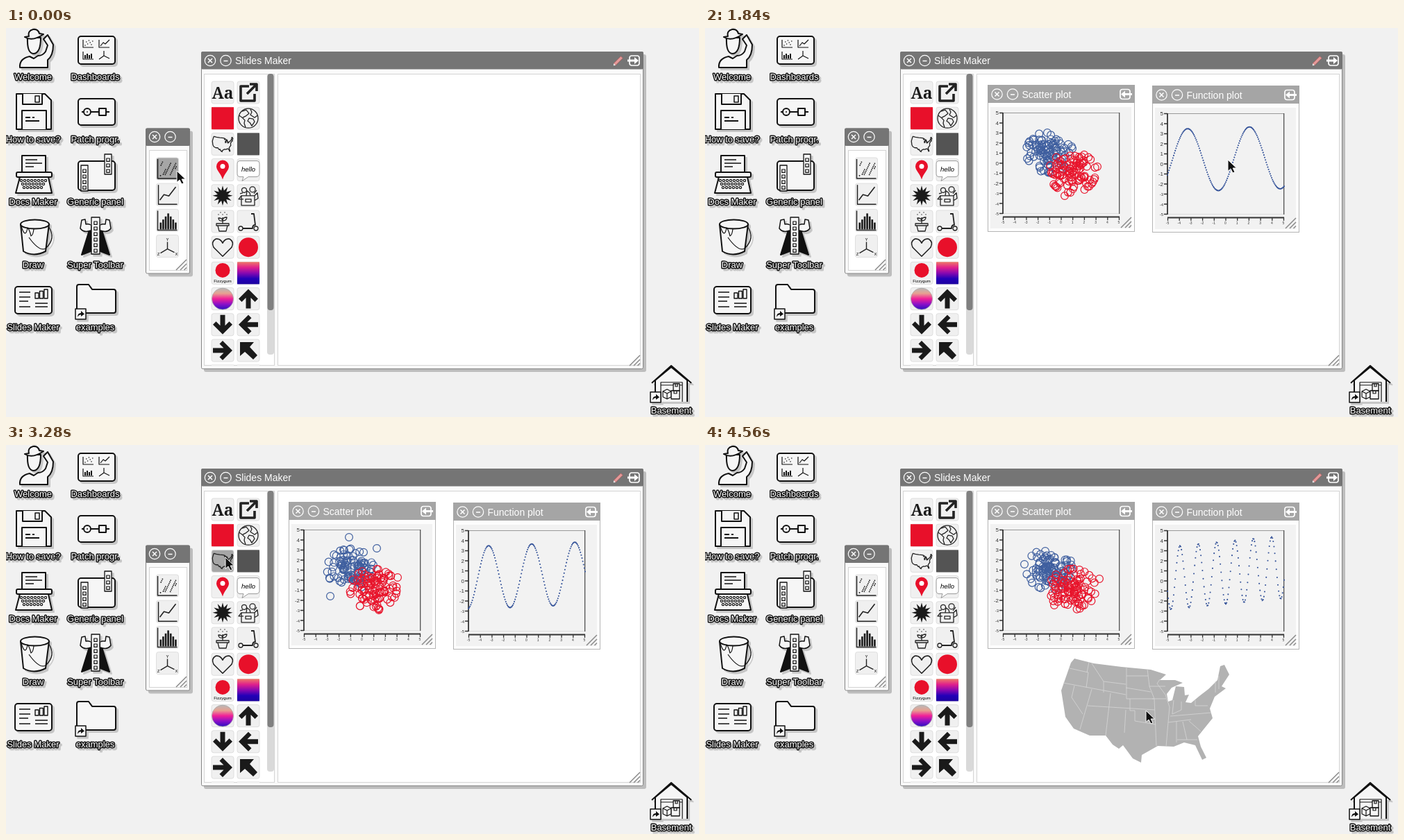
Recreate the animation shown at these times as an HTML page. Size 998 px wide and 561 px high, loop 4.64 s.

```html
<!DOCTYPE html>
<html lang="en">
<head>
<meta charset="utf-8">
<title>Desktop</title>
<style>
html, body { margin: 0; width: 100%; height: 100%; overflow: hidden; background: #f1f1f1; }
svg { display: block; width: 998px; height: 561px; font-family: Arial, "Liberation Sans", sans-serif; }
.icons { fill: #f6f6f6; stroke: #111; stroke-width: 2; stroke-linejoin: round; filter: drop-shadow(3px 3px 0 #c6c6c6); }
.icons text { font-size: 13px; text-anchor: middle; fill: #fff; stroke: #111; stroke-width: 3px; paint-order: stroke; }
.line { fill: none; stroke: #222; stroke-width: 1.3; stroke-linejoin: round; }
.title { font-size: 14px; fill: #fff; }
.tiny { font-size: 6px; text-anchor: middle; }
</style>
</head>
<body>
<svg id="stage" viewBox="0 0 998 561"></svg>
<script>
const LOOP = 4640, STEP = 80;

const P = (d, a = '') => `<path d="${d}" ${a}/>`;
const R = (x, y, w, h, a = '') => `<rect x="${x}" y="${y}" width="${w}" height="${h}" ${a}/>`;
const C = (x, y, r, a = '') => `<circle cx="${x}" cy="${y}" r="${r}" ${a}/>`;
const T = (x, y, s, a = '') => `<text x="${x}" y="${y}" ${a}>${s}</text>`;
const G = (x, y, s) => `<g transform="translate(${x} ${y})">${s}</g>`;
const L = (d, w = 1.3) => P(d, `class="line" style="stroke-width:${w}"`);
const times = (n, f) => Array.from({ length: n }, (_, i) => f(i)).join('');
const BLACK = 'fill="#111" stroke="none"';
const THIN = 'fill="none" stroke-width="1.2"';
const INK = 'fill="#1a1a1a"';
const RED = 'fill="#e8102a"';

// ---- map ----
const land = 'M532 308L560 315 600 320 642 324 664 331 655 339 677 339 688 343 672 350 665 359 667 370 673 368 678 348 690 349 691 361 697 360 692 371 700 372 712 362 725 352 738 339 742 319 748 317 755 331 744 348 750 351 734 363 727 380 731 394 710 420 714 435 722 451 716 454 706 433 690 429 675 435 652 434 629 447 628 458 616 452 602 433 596 438 587 432 577 419 554 419 531 409 519 392 513 354 527 314Z';
const borders = 'M525 322L552 328 549 350M516 343L606 360M532 347L528 364 544 388M557 352L540 410M551 376L648 382M584 358L577 419M606 382L604 415M553 313L550 328M557 315L574 341 606 345M574 341V357M607 320V366M607 333H638M606 350L642 356M607 366H646M612 366V383H619V398L649 403M637 323L640 348 647 366 650 434M640 348H663M644 366H664M655 338L651 344 663 360 669 378 667 400 664 435M675 368L673 388 686 382V370M670 391L729 386M667 400L700 396M679 399V429M688 399L694 425H709M680 425H694M697 398L714 413M706 368V376H724M735 341V357M740 333V352';

// ---- desktop icons ----
const tower = (n, w = 10) => R(0, 0, w, n * 8 + 5, 'stroke-width="1.3"') +
  times(n, i => R(w / 2 - 2.2, 6 + i * 8, 4.4, 4.4, THIN));
const badge = R(0, 0, 15, 15, 'stroke-width="1.5"') + P('M3 12Q3 6 8 6V3L13 7.5 8 11V8.5Q5 8 3 12Z', BLACK);
const board = (y, h = 40) => R(104, y, 53, h, 'rx="4"');

const greeter = P('M20 57Q19 44 34 41L40 44 46 40Q53 40 57 34L60 25 54 16 60 10 68 24Q68 40 60 46V57Z') +
  P('M31 14Q30 37 40 37 50 36 50 14Z') + P('M27 13Q38 20 54 9L48 8Q46 1 39 2 31 4 33 12Z');

const boards = board(12) + P('M111 17v11h15M134 17v11h15M111 34v11h15M136 26l4-5 3 2 6-6M141 33v7l-7 5M141 40l8 4', THIN) +
  times(4, i => P(`M${114 + i * 3} 44v-${5 + i % 2 * 2}`)) +
  times(7, i => C(114 + i * 1.8, 25 - (i * 5) % 8, .8, BLACK));

const floppy = P('M15 95H56L65 104V146H15Z') + P('M24 95V110H52V95M23 146V119H58V146') +
  R(42, 98, 6, 9, 'stroke-width="1.5"') + P('M28 129H35M38 129H41M28 134H48');

const patch = board(102, 38) + C(117, 121, 5) + R(134, 116, 10, 10) + P('M109 121h3M122 121h12M144 121h5') + C(117, 121, 1, BLACK);

const writer = R(23, 184, 34, 25) + P('M28 190H45M28 195H52M28 200H40', 'stroke-width="1.5"') + R(15, 208, 51, 7, 'rx="2"') +
  P('M20 215H61L66 238H14Z') +
  times(3, r => times(8 - r, i => C(22 + r * 2 + i * 5, 220 + r * 5, 1.6, 'fill="#fff" stroke-width="1.2"')));

const panel = board(192, 42) + G(108, 198, tower(4)) + G(142, 182, tower(3));

const bucket = P('M21 283L25 322Q40 331 57 322L62 283') + '<ellipse cx="41.5" cy="283" rx="20.5" ry="6.5"/>' +
  P('M22 286Q28 305 31 288 34 291 36 300 39 299 40 290M61 286Q73 303 57 318 48 323 33 302', THIN);

const wing = P('M-7-36L-20 6-7 1Z', 'fill="#111"') +
  P('M-7-29Q-17-25-22-32L-20-44-15-45-14-38Q-10-39-7-37', 'stroke-width="1.5"');
const hero = G(129, 321, wing + `<g transform="scale(-1 1)">${wing}</g>`) + G(123, 273, tower(6, 12));

const slides = R(13, 373, 53, 39, 'rx="4"') + P('M19 381H35M19 388H35M19 394H32M19 402H35M42 402H60M42 397H60', 'stroke-width="1.6"') +
  times(3, i => R(42 + i * 6.5, 382 - i * 2.5, 5, 8 + i * 2.5, 'stroke-width="1.4"'));

const folder = P('M102 411V373Q102 370 105 370H119L124 377H155Q158 377 158 380V408Q158 411 155 411Z') + G(100, 405, badge);

const shed = P('M935 539V508L958 489 981 508V539M930 512L958 487 987 512') + P('M943 539V511H974V539M943 515H974', THIN) +
  P('M946 524l6-3 6 3v8l-6 3-6-3ZM946 524l6 3 6-3M952 527v8', THIN) +
  R(958, 523, 12, 12, 'stroke-width="1.3"') + R(961, 513, 9, 10, 'stroke-width="1.3"') +
  P('M964 513v4h3v-4M962 523v4h4v-4', THIN) + G(928, 525, badge);

const names = ['Welcome', 'Dashboards', 'How to save?', 'Patch progr.', 'Docs Maker', 'Generic panel', 'Draw', 'Super Toolbar', 'Slides Maker', 'examples'];
const labels = names.map((s, i) => T(39 + i % 2 * 89.5, 75 + (i >> 1) * 90.2, s)).join('') + T(958, 556, 'Basement');
const desktop = `<g class="icons">${greeter}${boards}${floppy}${patch}${writer}${panel}${bucket}${hero}${slides}${folder}${shed}${labels}</g>`;

// ---- window parts ----
const bullets = (x, y) => G(x, y, `<g fill="none" stroke="#fff" stroke-width="1.2">${C(0, 0, 7.7)}${C(22.5, 0, 7.7)}` +
  P('M-3-3l6 6m0-6l-6 6M19.5 .5h6', 'stroke-width="1.5"') + '</g>');
const grip = (x, y) => G(x, y, P('M-15 0L0-15M-9 0L0-9M-3.5 0L0-3.5', 'stroke="#8a8a8a" stroke-width="1.5"'));
const frame = (x, y, w, h) => R(x + 4, y + 4, w, h, 'rx="3" fill="#bdbdbd"') +
  R(x + .5, y + .5, w - 1, h - 1, 'rx="2" fill="#fafafa" stroke="#858585"') + R(x, y, w, 25.5, 'rx="2" fill="#757575"');
const pane = (x, y, w, h) => R(x + .5, y + .5, w, h, 'fill="#fff" stroke="#d4d4d4"');
const button = (x, y, id, icon) => G(x, y, R(-16, -16, 32, 32, `id="${id}" rx="3" fill="#f0f0f0" stroke="#dedede"`) + icon);
const portal = (x, y, side) => G(x, y, R(-7, -7, 14, 14, 'rx="3" fill="none" stroke="#fff" stroke-width="1.7"') +
  P('M-10-1.5H0V-5L6 0 0 5V1.5H-10Z', `fill="#fff" transform="scale(${side} 1)"`));

// ---- tool icons ----
const spikes = times(24, i => {
  const a = i * Math.PI / 12, r = i % 2 ? 7.5 : 14.5;
  return `${i ? 'L' : 'M'}${(r * Math.sin(a)).toFixed(1)} ${(-r * Math.cos(a)).toFixed(1)}`;
}) + 'Z';
const block = side => R(-16, -16, 32, 32, side);
const arrow = a => P('M0-14L14 0 9.5 4.5 3.5-1.5V14H-3.5V-1.5L-9.5 4.5-14 0Z', `${INK} transform="rotate(${a})"`);
const letters = T(0, 9, 'Aa', `text-anchor="middle" font-size="23" font-weight="700" font-family="Noto Serif, serif" ${INK}`);
const popOut = L('M1-9H-11V12H9V2M2-12H12V-2M11-11L-2 2', 3.6);
const globe = C(0, 0, 14, 'class="line"') + L('M-13-4Q-8-1-5 3L-6 7-4 13M-9-10L-3-12 1-7-4-3-8-1M3-13L5-9 3-5 9-1 13-4M1 0L7 1 9 5 5 11 2 6-1 4Z');
const country = `<g transform="scale(.122 .148) translate(-634 -383)">${P(land, 'class="line" vector-effect="non-scaling-stroke"')}</g>`;
const pin = P('M0 14C-2 6-9 1-9-5A9 9 0 0 1 9-5C9 1 2 6 0 14Z', RED) + C(0, -5, 3.5, 'fill="#fff"');
const speech = P('M-12-13H12Q16-13 16-8V5Q16 10 11 10H0L-9 16-7 10H-12Q-16 10-16 5V-8Q-16-13-12-13Z', 'fill="#fff" stroke="#999"') +
  T(0, 2, 'hello', 'font-size="9.5" font-style="italic" text-anchor="middle"');
const toyBox = L('M-10 0H9V14H-10ZM-10 0L-14 5H-7M9 0L13-4 14 4 9 7M-4 5H4V9H-4Z') + C(-6, -8, 3.5, 'class="line"') +
  C(6, -9, 4, 'class="line"') + L('M-3 0L-2-7 2-4 3 0M-12-3L-8-4M8-3L12-8');
const plant = L('M-9 3H9V6H-9ZM-7 6L-5 14H5L7 6M0 3V-6M0-1Q-6 0-6-5 0-5 0-1Q6-1 6-6 0-6 0-2') +
  times(5, i => C(i * 3 - 6, -10 - i % 2 * 3, .7, INK));
const scooter = C(-11, 10, 3, 'class="line"') + C(11, 10, 3, 'class="line"') + L('M-8 10H6Q6 5 10 5L8-11H4', 1.8);
const heart = L('M0 13L-13 0Q-17-8-10-12-3-13 0-6 3-13 10-12 17-8 13 0Z', 1.6);
const dot = C(0, 0, 14, RED);
const named = C(0, -4, 10.5, RED) + T(0, 14, 'Fizzygum', 'class="tiny"');
const orb = C(0, 0, 15.5, 'fill="url(#orb)" stroke="#aaa" stroke-width=".7"');
const corner = P('M-12-12H8L2-5 13 7 7 13-5 2-12 8Z', INK);
const tools = [letters, popOut, block(RED), globe, country, block('fill="#545454"'), pin, speech, P(spikes, INK), toyBox, plant, scooter,
  heart, dot, named, block('fill="url(#dusk)"'), orb, arrow(0), arrow(180), arrow(-90), arrow(90), corner];

const specks = L('M-14-14V14H14', 1.5) + times(26, i => C(-10 + (i * 7.3) % 23, 10 - (i * 5.9 + i % 3 * 3) % 20, .9, INK));
const trend = L('M-13-14V14H14', 1.5) + L('M-11 8L-5 0 2 2 12-11', 1.6);
const bars = L('M-14-14V14H14', 1.5) + times(7, i => {
  const h = 23 - Math.abs(i - 3) * 4.4;
  return R(-11 + i * 3.6, 13 - h, 2.6, h, INK);
});
const space = L('M0-6V4L-10 10M0 4L10 9', 1.4) + T(0, -8, 'Y', 'class="tiny"') + T(-13, 13, 'Z', 'class="tiny"') + T(13, 13, 'X', 'class="tiny"');

const pencil = '<g transform="translate(882 47) rotate(-45) scale(.85)">' +
  R(-9, -2.3, 17, 4.6, 'fill="#e59a9a" stroke="#a55" stroke-width=".8"') + P('M-9-2.3L-12 0-9 2.3Z', 'fill="#eee"') + '</g>';
const maker = frame(281, 34, 637, 458) + bullets(294, 47) + T(330, 52, 'Slides Maker', 'class="title"') +
  pencil + portal(905, 47, 1) + pane(285, 66, 101, 420) + pane(391, 66, 522, 420) +
  tools.map((s, i) => button(i % 2 ? 349 : 312, 93 + (i >> 1) * 37.2, 'tool' + i, s)).join('') +
  R(296, 485, 32, 2, 'fill="#eee"') + R(333, 485, 32, 2, 'fill="#eee"') +
  R(376, 66, 10, 405, 'rx="4" fill="#d9d9d9"') + R(376.5, 66, 9, 341, 'rx="4" fill="#808080"') + grip(913, 487);

const toolbar = frame(201, 144.5, 64, 210) + bullets(214, 157) + pane(206, 176, 54, 173) +
  [specks, trend, bars, space].map((s, i) => button(232.5, 203 + i * 37.2, 'plot' + i, s)).join('') + grip(260, 349);

// ---- chart windows, 212 px square ----
const axes = P('M22 40.5H190', 'stroke="#999"') + P('M22 185.5H190', 'stroke="#ddd"') + P('M189.7 40V186', 'stroke="#444" stroke-width="1.2"') +
  P('M22 40V186M22 190.5H190', 'stroke="#333" stroke-width="1.8"') +
  times(11, i => P(`M17 ${40.5 + i * 14.5}H22M${22.5 + i * 16.7} 190v5`, 'stroke="#333" stroke-width="1.3"') +
    T(16, 43 + i * 14.5, 5 - i, `font-size="${i > 7 ? 6 : 8}" text-anchor="end" fill="#333"`) +
    T(22 + i * 16.7, 199.5, i - 5, 'font-size="5" text-anchor="middle" fill="#333"'));
const chart = (id, name, body) => `<g id="${id}">` +
  R(5, 5, 212, 212, `fill="#000" opacity=".18" id="${id}Shade"`) +
  R(.5, .5, 211, 211, 'fill="#fdfdfd" stroke="#b5b5b5"') + R(0, 0, 212, 26, 'fill="#a5a5a5"') +
  R(4, 32, 203, 175, 'fill="#f2f2f2"') + bullets(13.5, 13.5) + T(49.5, 18.5, name, 'class="title"') +
  portal(198, 13.5, -1) + axes + body + grip(207, 206) + '</g>';
const trace = (id, color, w) => P('', `id="${id}" fill="none" stroke="${color}" stroke-width="${w}" stroke-linecap="round"`);

// ---- data: four alternating states ----
const ring = ([x, y]) => `M${(x - 5.4).toFixed(1)} ${y.toFixed(1)}a5.4 5.4 0 1 0 10.8 0a5.4 5.4 0 1 0-10.8 0`;
function cloud(seed, x, y, far) {
  const rnd = () => (seed = (seed * 16807) % 2147483647) / 2147483647;
  const pts = far.slice();
  while (pts.length < 100) {
    const r = Math.min(2.1, Math.sqrt(-2 * Math.log(rnd()))), a = rnd() * 2 * Math.PI;
    pts.push([x + 16 * r * Math.cos(a), y + 14 * r * Math.sin(a)]);
  }
  return pts.map(ring).join('');
}
const blueFar = [[[86, 69], [121, 89]], [[32, 95], [131, 70], [57, 132]], [[87, 51], [127, 67], [60, 136]], [[83, 71], [53, 90]]];
const redFar = [[[158, 118], [111, 160]], [[156, 108], [92, 147]], [[157, 109], [130, 156]], [[161, 111], [96, 149]]];
// states in order of time; the last two far sets are stored in swapped order
const order = [0, 1, 3, 2];
const blues = order.map(i => cloud(811 + i * 977, 89, 97, blueFar[i]));
const reds = order.map(i => cloud(4321 + i * 733, 122, 126, redFar[i]));
// wave: period and zero crossing in px
const waves = [[89, 28.7], [242, 94.5], [26.4, 33.4], [62, 35.5]].map(([period, zero]) => times(151, i => {
  const x = 22 + i * 1.12, u = (x - zero) * 2 * Math.PI / period;
  return `M${x.toFixed(2)} ${(112.5 - 14.5 * (3.12 * Math.sin(u) + .3 + .028 * u)).toFixed(2)}h0`;
}));

const grad = (id, cs) => `<linearGradient id="${id}" x2="0" y2="1">` +
  cs.map((c, i) => `<stop offset="${i / (cs.length - 1)}" stop-color="${c}"/>`).join('') + '</linearGradient>';
const bubble = 'M9 0H79Q87 0 87 8.5T79 17H15L5 24 8 17Q0 17 0 8.5T9 0Z';
const tip = G(241, 203, P(bubble, 'fill="#c4c4c4"')) + G(239, 201, P(bubble, 'fill="#fff" stroke="#aaa"')) +
  T(247, 214, 'function plot', 'font-size="13" font-style="italic" fill="#111"');

document.getElementById('stage').innerHTML =
  grad('dusk', ['#ee7868', '#e0208c', '#8a08b0', '#2400b8', '#1c00a0']) +
  grad('orb', ['#b8b8b8', '#e8a090', '#f02098', '#8a10c8', '#2c10c0']) +
  R(0, 0, 998, 561, 'fill="#f1f1f1"') + desktop + maker + toolbar +
  '<g id="map">' + P(land, 'id="mapShade" fill="#ededed" transform="translate(5 6)"') + P(land, 'fill="#b2b2b2"') +
  P(borders, 'fill="none" stroke="#d6d6d6" stroke-width=".8"') + '</g>' +
  chart('scatter', 'Scatter plot', trace('blue', '#3f5f9f', 1.2) + trace('red', '#e8152c', 1.2)) +
  chart('func', 'Function plot', trace('wave', '#36549a', 2.1)) +
  `<g id="tip">${tip}</g>` +
  P('M0 0V16.5L4 13 7 19 10 17.7 7.2 12H12.5Z', 'id="cursor" fill="#111" stroke="#fff"');

// ---- motion: time, x, y ----
const path = [[0, 246, 206], [160, 250, 206], [560, 508, 186], [640, 513, 187], [880, 516, 189], [960, 516, 189],
  [1120, 244, 234], [1280, 246, 236], [1360, 528, 250], [1600, 728, 198], [1840, 753, 190], [2000, 753, 190],
  [2400, 371, 242], [2720, 314, 168], [3280, 316, 162], [3440, 325, 172], [4000, 629, 390], [4320, 635, 383], [LOOP, 635, 383]];
function pointer(t) {
  const i = path.findIndex(k => k[0] > t), [t0, x0, y0] = path[i - 1], [t1, x1, y1] = path[i];
  const p = (t - t0) / (t1 - t0), e = p * p * (3 - 2 * p);
  return [x0 + (x1 - x0) * e, y0 + (y1 - y0) * e];
}
const $ = id => document.getElementById(id);
const show = (id, on) => $(id).setAttribute('display', on ? 'inline' : 'none');
const move = (id, x, y) => $(id).setAttribute('transform', `translate(${x.toFixed(1)} ${y.toFixed(1)})`);
const within = (t, a, b) => t >= a && t < b;
const hot = (id, on) => $(id).setAttribute('fill', on ? '#a6a6a6' : '#f0f0f0');

// id, time it appears, time it is dropped, grab point
const carried = [['scatter', 240, 880, 109, 107], ['func', 1440, 1840, 109, 107], ['map', 3520, 4320, 635, 383]];

function draw(t) {
  const [x, y] = pointer(t);
  move('cursor', x, y);
  for (const [id, from, drop, dx, dy] of carried) {
    const [px, py] = pointer(Math.min(t, drop));
    move(id, px - dx, py - dy);
    show(id, t >= from);
    show(id + 'Shade', within(t, from, drop));
  }
  const s = Math.floor((t + 110) % 1840 / 460);
  $('blue').setAttribute('d', blues[s]);
  $('red').setAttribute('d', reds[s]);
  $('wave').setAttribute('d', waves[s]);
  hot('plot0', t < 240);
  hot('plot1', within(t, 1120, 1440));
  hot('tool4', within(t, 2720, 3520));
  show('tip', within(t, 1200, 1440));
}

let start, last;
function tick(now) {
  start ??= now;
  const t = Math.floor((now - start) % LOOP / STEP) * STEP;
  if (t !== last) draw(last = t);
  requestAnimationFrame(tick);
}
draw(0);
requestAnimationFrame(tick);
</script>
</body>
</html>
```
